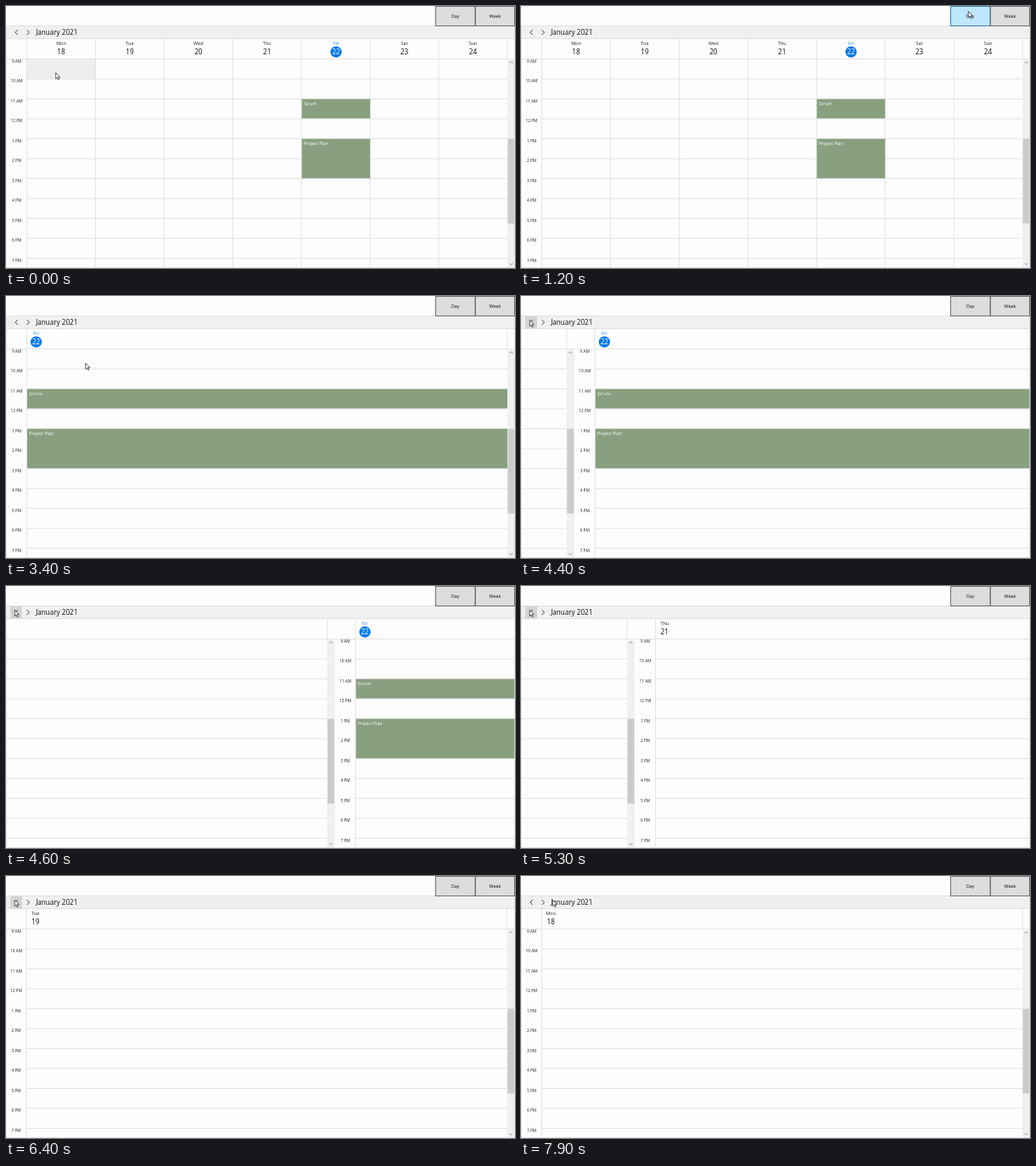
Recreate the animation shown at these times as an HTML page. Size 600 by 309 pixels, loop 8 s.

```html
<!DOCTYPE html>
<html lang="en">
<head>
<meta charset="utf-8">
<title>Calendar</title>
<style>
html, body { margin: 0; width: 100%; height: 100%; overflow: hidden; background: #fdfdfd; }
svg { display: block; width: 600px; height: 309px; font-family: "Open Sans", "Noto Sans", sans-serif; }
</style>
</head>
<body>
<svg id="stage" viewBox="0 0 600 309"></svg>
<script>
const LOOP = 8000, LEFT = 24.5, RIGHT = 591, TOP = 62.5, BOTTOM = 308.5, ROW = 23.5;
const COL = (RIGHT - LEFT) / 7, SLIDE = 520;
const PAPER = '#fdfdfd', GRID = '#dedede', INK = '#222', GREEN = '#88a080', BLUE = '#0078e8';
const DAYS = ['Mon', 'Tue', 'Wed', 'Thu', 'Fri', 'Sat', 'Sun'];
const stage = document.getElementById('stage');

const rect = (x, y, w, h, fill, more = '') =>
  `<rect x="${x}" y="${y}" width="${w}" height="${h}" fill="${fill}" ${more}/>`;
const line = (x1, y1, x2, y2) =>
  `<path d="M${x1} ${y1}L${x2} ${y2}" stroke="${GRID}" stroke-width=".8"/>`;
const text = (s, x, y, size, fill = INK, anchor = 'middle') =>
  `<text x="${x}" y="${y}" font-size="${size}" fill="${fill}" text-anchor="${anchor}">${s}</text>`;
const chevron = (d, color, w) =>
  `<path d="${d}" fill="none" stroke="${color}" stroke-width="${w}"/>`;

function dayHead(i, x) {
  const today = i === 4;
  return text(DAYS[i], x + (today ? .4 : 0), 46, 5.5, today ? '#1683dd' : INK) +
    (today ? `<circle cx="${x + .4}" cy="54.2" r="6.6" fill="${BLUE}"/>` : '') +
    text(18 + i, x + (today ? .4 : 0), 57.1, 8.2, today ? '#fff' : '#111');
}

function events(x, w) {
  const item = (name, y, h) => rect(x, y, w, h, GREEN) + text(name, x + 2.3, y + 7.3, 5.2, '#fff', 'start');
  return item('Scrum', 109.8, 22.8) + item('Project Plan', 156.7, 46.5);
}

function scrollbar() {
  return rect(RIGHT, TOP, 9, BOTTOM - TOP, '#f0f0f0') + rect(RIGHT + .5, 156.5, 8, 100, '#cbcbcb') +
    chevron('M593.6 67.6l1.9-1.9 1.9 1.9', '#666', .7) +
    chevron('M593.6 303.4l1.9 1.9 1.9-1.9', '#666', .7);
}

// A page shows one day, or the whole week when day is null.
function page(day) {
  const week = day === null;
  let s = rect(0, TOP, 600, BOTTOM - TOP, PAPER);
  if (week) s += rect(0, 0, COL, ROW, '#eee', 'id="cell"');
  for (let i = 0; i < 11; i++) {
    const hour = 9 + i, y = TOP + i * ROW;
    if (i) s += line(LEFT, y, RIGHT, y);
    s += text(`${(hour + 11) % 12 + 1} ${hour < 12 ? 'AM' : 'PM'}`, 12.5, y + 4.3, 4.75);
  }
  s += rect(0, 38.5, 600, TOP - 38.5, PAPER) + line(0, TOP, 600, TOP);
  if (week) {
    for (let i = 0; i < 7; i++) {
      const x = LEFT + i * COL;
      s += line(x, 38.5, x, BOTTOM) + dayHead(i, x + COL / 2);
    }
    s += events(348.7, 80.5);
  } else {
    s += line(LEFT, 38.5, LEFT, BOTTOM) + dayHead(day, 35.2);
    if (day === 4) s += events(25, 566);
  }
  return `<g class="page">${s}${line(RIGHT, 38.5, RIGHT, TOP)}${scrollbar()}</g>`;
}

const button = (id, name, x, w) =>
  rect(x, .5, w, 23, '#ddd', `id="${id}" stroke="#707070" stroke-width="1"`) + text(name, x + w / 2, 14.1, 5.4, '#111');

stage.innerHTML = rect(0, 0, 600, 309, PAPER) +
  [null, 4, 3, 2, 1, 0].map(page).join('') +
  rect(0, 23.5, 600, 15, '#f0f0f0') + line(0, 23.5, 600, 23.5) + line(0, 38.5, 600, 38.5) +
  line(.4, 23.5, .4, BOTTOM) + line(599.6, 23.5, 599.6, BOTTOM) + line(0, BOTTOM, 600, BOTTOM) +
  rect(5, 24, 14, 14.3, '#d4d4d4', 'id="back"') +
  chevron('M13.8 28.2l-2.9 2.9 2.9 2.9', '#333', .9) + chevron('M24.6 28.2l2.9 2.9-2.9 2.9', '#333', .9) +
  text('January 2021', 35.2, 34, 8.1, '#111', 'start') +
  button('day', 'Day', 506.5, 46.5) + button('week', 'Week', 553.5, 46) +
  `<path id="cursor" d="M0 0V7.2L1.7 5.7 2.8 8.3 4 7.8 2.9 5.3H5.1Z" fill="#fff" stroke="#222" stroke-width=".7"/>`;

const pages = [...document.querySelectorAll('.page')];
const [cell, back, day, cursor] = ['cell', 'back', 'day', 'cursor'].map(id => document.getElementById(id));

// Start times of the slides to the previous day.
const slides = [4292, 5138, 5890, 6620];
// Pointer path: time, x, y.
const path = [
  [0, 58.7, 78.7], [100, 58.7, 78.7], [400, 92, 112], [700, 205, 90], [900, 306, 54], [1130, 527.3, 6.3],
  [2420, 527.3, 6.3], [2900, 330, 55], [3300, 110, 84], [3800, 30, 60], [4150, 10.3, 28.3],
  [7250, 10.3, 28.3], [7500, 14, 80], [7700, 20, 122], [7800, 46, 70], [7900, 37.2, 28.3], [8000, 37.2, 28.3]
];

function pointer(t) {
  const i = Math.max(1, path.findIndex(p => p[0] >= t));
  const [t0, x0, y0] = path[i - 1], [t1, x1, y1] = path[i];
  const k = (t - t0) / (t1 - t0);
  return [x0 + (x1 - x0) * k, y0 + (y1 - y0) * k];
}

const ease = k => (1 - Math.cos(Math.PI * Math.min(1, Math.max(0, k)))) / 2;

function draw(t) {
  const moved = slides.reduce((sum, start) => sum + ease((t - start) / SLIDE), 0);
  const week = t < 1750;
  pages.forEach((p, i) => {
    const x = i ? (moved - i + 1) * 600 : 0;
    const shown = i ? !week && Math.abs(x) < 600 : week;
    p.style.display = shown ? '' : 'none';
    p.setAttribute('transform', `translate(${x.toFixed(2)} 0)`);
  });

  const [x, y] = pointer(t);
  cursor.setAttribute('transform', `translate(${x.toFixed(2)} ${y.toFixed(2)})`);
  const inCells = y > TOP && x > LEFT && x < RIGHT;
  cell.style.display = inCells ? '' : 'none';
  cell.setAttribute('x', LEFT + Math.floor((x - LEFT) / COL) * COL);
  cell.setAttribute('y', TOP + Math.floor((y - TOP) / ROW) * ROW);

  const onDay = x > 506 && x < 553 && y < 24;
  const pressed = t >= 1600 && t < 1750;
  day.setAttribute('fill', onDay ? (pressed ? '#c4e5f6' : '#bee6fd') : '#ddd');
  day.setAttribute('stroke', onDay ? (pressed ? '#2c628b' : '#3c7fb1') : '#707070');
  back.style.display = x > 5 && x < 19 && y > 24 && y < 38.3 ? '' : 'none';
}

function tick(now) {
  draw(now % LOOP);
  requestAnimationFrame(tick);
}
draw(0);
requestAnimationFrame(tick);
</script>
</body>
</html>
```
